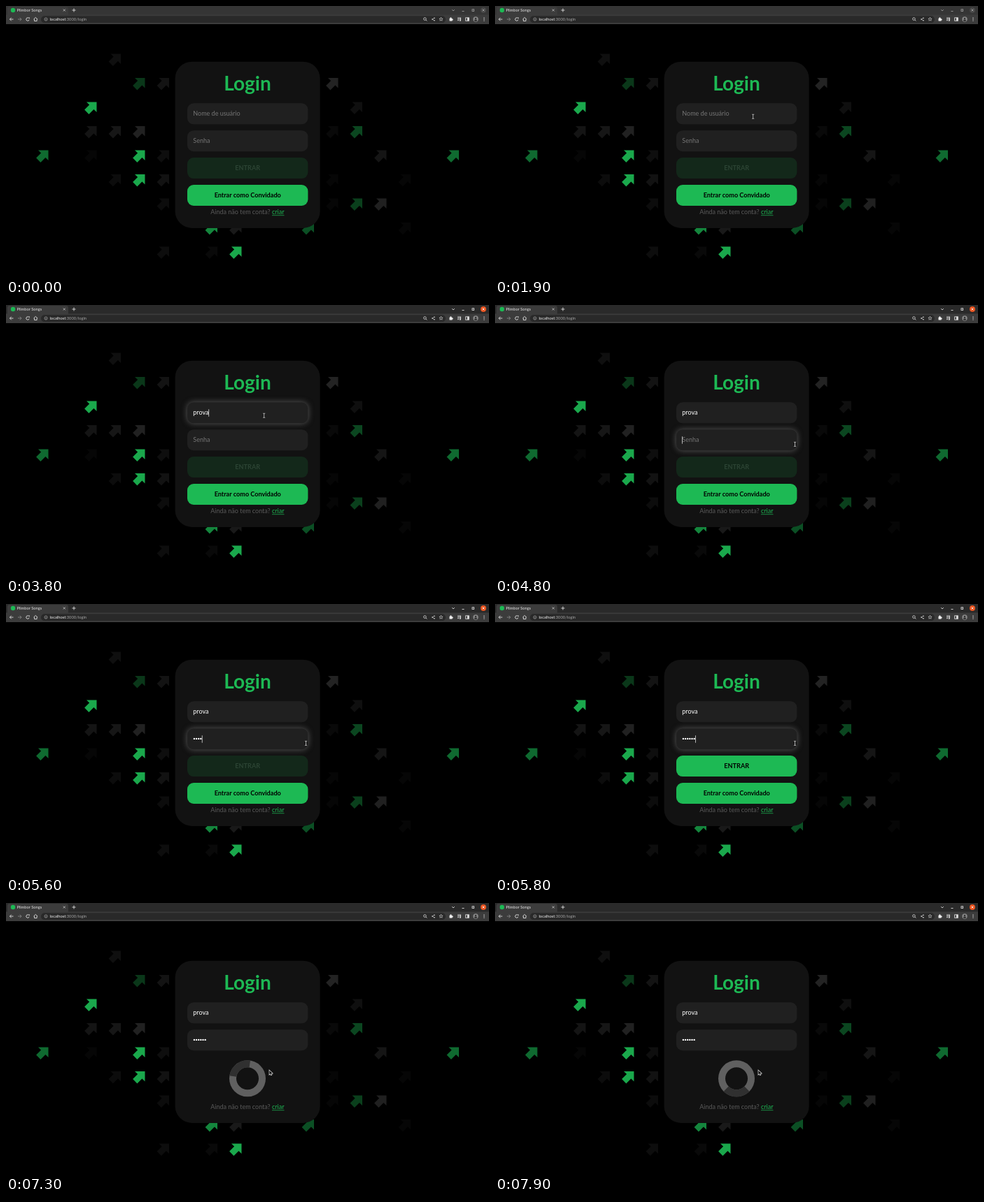
Animation of 690 by 388 pixels, one loop 8000 ms. Source, as an HTML page with a canvas:

```html
<!DOCTYPE html>
<html lang="pt-BR">
<head>
<meta charset="utf-8">
<title>Login</title>
<style>
html, body { margin: 0; width: 100%; height: 100%; overflow: hidden; background: #000; }
canvas { display: block; width: 690px; height: 388px; }
</style>
</head>
<body>
<canvas id="stage"></canvas>
<script>
const W = 690, H = 388, LOOP = 8000;
const GREEN = '#1db954';
const USER = 'prova';
const canvas = document.getElementById('stage');
const ctx = canvas.getContext('2d');
const dpr = window.devicePixelRatio || 1;
canvas.width = W * dpr;
canvas.height = H * dpr;

// Keystroke times, and spans in which the text caret is hidden
const USER_KEYS = [3300, 3400, 3500, 3700, 3800];
const PASS_KEYS = [5000, 5200, 5300, 5600, 5700, 5800];
const CARET_OFF = [[2700, 3000], [4900, 5000], [6400, 6900]];
const FOCUS_USER = 2100, FOCUS_PASS = 4300, BLUR = 7100, LOADING = 7200;

// Pointer: start time, shape, x, y
const POINTER = [
  [1000, 'arrow', 569.5, 242.5],
  [1500, 'beam', 404, 189.5],
  [1900, 'beam', 368.7, 158.2],
  [4800, 'beam', 428.5, 199.3],
  [7000, 'hand', 376.8, 239],
  [7200, 'arrow', 376.3, 239.7]
];

// Background arrows per grid row: column, colour
const BRIGHT = '#1aa84c', MID = '#0f6a30', DEEP = '#0b4620';
const ARROWS = [
  [[3, '#0f0f0f']],
  [[4, '#0a3719'], [5, '#131313'], [12, '#232323']],
  [[2, BRIGHT], [13, '#0f0f0f']],
  [[2, '#141414'], [3, '#161616'], [4, '#212121'], [12, '#090909'], [13, DEEP]],
  [[0, MID], [2, '#060606'], [4, BRIGHT], [5, '#0e0e0e'], [14, '#151515'], [17, MID]],
  [[3, '#0c0c0c'], [4, BRIGHT], [5, '#121212'], [12, '#060606'], [15, '#060606']],
  [[5, '#0c0c0c'], [12, '#060606'], [13, '#0a3f1c'], [14, '#202020']],
  [[7, '#14863d'], [8, '#191919'], [11, '#0b4f24'], [15, '#060606']],
  [[5, '#0d0d0d'], [7, '#090909'], [8, BRIGHT]]
];

const count = (keys, t) => keys.filter(k => t >= k).length;

function box(x, y, w, h, r, fill) {
  ctx.fillStyle = fill;
  ctx.beginPath();
  ctx.roundRect(x, y, w, h, r);
  ctx.fill();
}

function dot(x, y, r, fill) {
  ctx.fillStyle = fill;
  ctx.beginPath();
  ctx.arc(x, y, r, 0, Math.PI * 2);
  ctx.fill();
}

function poly(points, x, y, fill, stroke, width = 0.8) {
  ctx.beginPath();
  points.forEach(([px, py]) => ctx.lineTo(x + px, y + py));
  ctx.closePath();
  if (stroke) {
    ctx.strokeStyle = stroke;
    ctx.lineWidth = width;
    ctx.stroke();
  }
  ctx.fillStyle = fill;
  ctx.fill();
}

function line(points, color = '#ddd', width = 0.9) {
  ctx.strokeStyle = color;
  ctx.lineWidth = width;
  ctx.beginPath();
  points.forEach(([x, y]) => ctx.lineTo(x, y));
  ctx.stroke();
}

function ring(x, y, r, color = '#ddd', width = 0.8, from = 0, to = Math.PI * 2) {
  ctx.strokeStyle = color;
  ctx.lineWidth = width;
  ctx.beginPath();
  ctx.arc(x, y, r, from, to);
  ctx.stroke();
}

function cross(x, y, r, color) {
  line([[x - r, y - r], [x + r, y + r]], color, 0.8);
  line([[x - r, y + r], [x + r, y - r]], color, 0.8);
}

function text(str, x, y, size, color, weight = 400, align = 'left') {
  ctx.font = `${weight} ${size}px Lato, sans-serif`;
  ctx.textAlign = align;
  ctx.fillStyle = color;
  ctx.fillText(str, x, y);
  return ctx.measureText(str).width;
}

function drawTabs(active) {
  ctx.fillStyle = active ? '#2a2a2a' : '#353535';
  ctx.fillRect(0, 0, W, 13);
  box(2, 1, 87, 14, 3, '#3c3c3c');
  dot(10, 6, 3.2, GREEN);
  text('Plimbor Songs', 15.5, 8.1, 5.7, '#e4e4e4');
  cross(83.3, 6, 1.5, '#ccc');
  line([[94.5, 6], [99.5, 6]]);
  line([[97, 3.5], [97, 8.5]]);

  const ink = active ? '#ddd' : '#999';
  line([[637.2, 5.2], [639, 7], [640.8, 5.2]], ink);
  line([[651.5, 7.5], [654.5, 7.5]], ink);
  ctx.strokeRect(666, 4.8, 2.6, 2.6);
  dot(682, 6, 4, active ? '#e95420' : '#484848');
  cross(682, 6, 1.4, active ? '#fff' : '#aaa');
}

function drawToolbar() {
  ctx.fillStyle = '#3c3c3c';
  ctx.fillRect(0, 12.5, W, 13.5);
  line([[10.5, 19], [5.5, 19]]);
  line([[7.7, 16.7], [5.4, 19], [7.7, 21.3]]);
  line([[17, 19], [22, 19]], '#888');
  line([[19.8, 16.7], [22.1, 19], [19.8, 21.3]], '#888');
  ring(31, 19, 2.2, '#ddd', 0.9, 0.3, 5.4);
  poly([[0.8, -2.6], [2.8, -2.6], [2.8, -0.5]], 31, 19, '#ddd');
  line([[39.5, 19], [42.3, 16.4], [45.1, 19]]);
  line([[40.5, 18.5], [40.5, 21.5], [44.1, 21.5], [44.1, 18.5]]);

  box(50, 14.3, 578, 9.8, 4.9, '#292929');
  ring(57, 19, 2.1, '#bbb', 0.6);
  line([[57, 18.6], [57, 20.2]], '#bbb', 0.6);
  const w = text('localhost', 62.5, 21.1, 5.8, '#f0f0f0');
  text(':3000/login', 62.5 + w, 21.1, 5.8, '#a5a5a5');

  ring(598.4, 18.5, 1.8);
  line([[599.8, 19.9], [601.3, 21.4]]);
  line([[612, 17.2], [609, 19], [612, 20.8]], '#ddd', 0.6);
  [[612, 17.2], [609, 19], [612, 20.8]].forEach(([x, y]) => dot(x, y, 0.8, '#ddd'));
  const star = Array.from({ length: 11 }, (_, i) => {
    const a = i * Math.PI / 5 - Math.PI / 2, r = i % 2 ? 1.2 : 2.7;
    return [621.5 + r * Math.cos(a), 19 + r * Math.sin(a)];
  });
  line(star, '#ddd', 0.6);

  box(633.5, 17.5, 4, 4, 0.5, '#eee');
  dot(635.4, 17.2, 1, '#eee');
  dot(637.7, 19.4, 1, '#eee');
  [17, 18.8, 20.6].forEach((y, i) => line([[645, y], [i < 2 ? 650 : 647, y]]));
  line([[649.5, 17], [649.5, 20.7]]);
  dot(648.8, 20.8, 1, '#ddd');
  ctx.strokeRect(656.7, 16.8, 4.6, 4.4);
  ctx.fillStyle = '#ddd';
  ctx.fillRect(659, 16.8, 2.3, 4.4);
  dot(671, 19, 3.7, '#888');
  dot(671, 18, 1.3, '#333');
  box(669, 19.6, 4, 2.4, 1.2, '#333');
  [16.9, 19, 21.1].forEach(y => dot(683, y, 0.65, '#ddd'));
}

function drawArrows() {
  const shape = [[-6, -8.5], [8.5, -8.5], [8.5, 6], [4.4, 1.9], [-2.6, 8.9], [-8.9, 2.6], [-1.9, -4.4]];
  ARROWS.forEach((row, j) => row.forEach(([i, color]) =>
    poly(shape, 52 + 34.5 * i, 77 + 34.5 * j, color)));
}

function drawField(y, focused) {
  ctx.save();
  if (focused) {
    ctx.shadowColor = 'rgba(150,150,150,.55)';
    ctx.shadowBlur = 8 * dpr;
  }
  box(259, y, 172.4, 30, 9, '#202020');
  ctx.restore();
}

function drawCaret(x, y) {
  ctx.fillStyle = '#ddd';
  ctx.fillRect(x, y - 5, 0.8, 10.5);
}

function drawButton(y, label, enabled) {
  box(259, y, 172.4, 30, 9, enabled ? GREEN : '#13281a');
  text(label, 345.2, y + 18, 9.1, enabled ? '#000' : '#2c4434', 700, 'center');
}

function drawSpinner(t) {
  const mid = Math.PI / 2 + (t - 7900) / 1000 * Math.PI * 2;
  ring(345, 251.3, 21, '#606060', 10);
  ring(345, 251.3, 21, '#303030', 10, mid - Math.PI / 4, mid + Math.PI / 4);
}

function drawCard(t) {
  const loading = t >= LOADING;
  const shift = loading ? 3 : 0;
  const onUser = t >= FOCUS_USER && t < FOCUS_PASS;
  const onPass = t >= FOCUS_PASS && t < BLUR;
  const caret = !CARET_OFF.some(([a, b]) => t >= a && t < b);

  box(241.6, 79.7 + shift, 207, 238.2 - 2 * shift, 24, '#121212');
  text('Login', 345, 121.3 + shift, 28, GREEN, 700, 'center');

  const userY = 139.3 + shift, passY = 178.2 + shift;
  drawField(userY, onUser);
  drawField(passY, onPass);

  const typed = USER.slice(0, count(USER_KEYS, t));
  const userW = text(typed, 267.3, userY + 18, 9, '#fff');
  if (!typed) text('Nome de usuário', 267.3, userY + 18, 9, '#757575');
  if (onUser && caret) drawCaret(267.2 + userW, userY + 15);

  const bullets = count(PASS_KEYS, t);
  for (let i = 0; i < bullets; i++) dot(268.9 + 3.15 * i, passY + 14.7, 1.2, '#fff');
  if (!bullets) text('Senha', 267.3, passY + 18, 9, '#757575');
  if (onPass && caret) drawCaret(267.2 + 3.15 * bullets, passY + 15);

  if (loading) {
    drawSpinner(t);
  } else {
    drawButton(217.1, 'ENTRAR', bullets === PASS_KEYS.length);
    drawButton(256, 'Entrar como Convidado', true);
  }

  const footY = 298.3 - shift;
  text('Ainda não tem conta?', 292.2, footY, 9, '#5a5a5a');
  const linkW = text('criar', 380, footY, 9, GREEN);
  line([[380, footY + 1.4], [380 + linkW, footY + 1.4]], GREEN, 0.7);
}

const POINTER_SHAPES = {
  arrow(x, y) {
    poly([[0, 0], [0, 5.8], [1.4, 4.6], [2.3, 6.6], [3.3, 6.1], [2.4, 4.2], [4.2, 4.1]], x, y, '#111', '#eee', 1.3);
  },
  beam(x, y) {
    const bars = [[[-1.6, -3], [1.6, -3]], [[0, -3], [0, 3]], [[-1.6, 3], [1.6, 3]]];
    [['#000', 1.8], ['#ccc', 0.9]].forEach(([color, width]) =>
      bars.forEach(bar => line(bar.map(([px, py]) => [x + px, y + py]), color, width)));
  },
  hand(x, y) {
    poly([[-0.7, 0], [0.4, 0], [0.6, 2.1], [2.8, 2.8], [2.6, 5], [2, 6.2], [-0.9, 6.2], [-2.5, 3.6], [-1.8, 3.2], [-0.7, 4]],
      x, y, '#fff', '#222', 1);
  }
};

function drawPointer(t) {
  const current = POINTER.filter(p => t >= p[0]).pop();
  if (current) POINTER_SHAPES[current[1]](current[2], current[3]);
}

function draw(t) {
  ctx.setTransform(dpr, 0, 0, dpr, 0, 0);
  ctx.fillStyle = '#000';
  ctx.fillRect(0, 0, W, H);
  drawTabs(t >= FOCUS_USER);
  drawToolbar();
  drawArrows();
  drawCard(t);
  drawPointer(t);
}

const start = performance.now();
function tick() {
  // Steps fall on tenths of a second
  const t = (performance.now() - start) % LOOP;
  draw(Math.floor(t / 100) * 100);
  requestAnimationFrame(tick);
}
tick();
</script>
</body>
</html>
```
